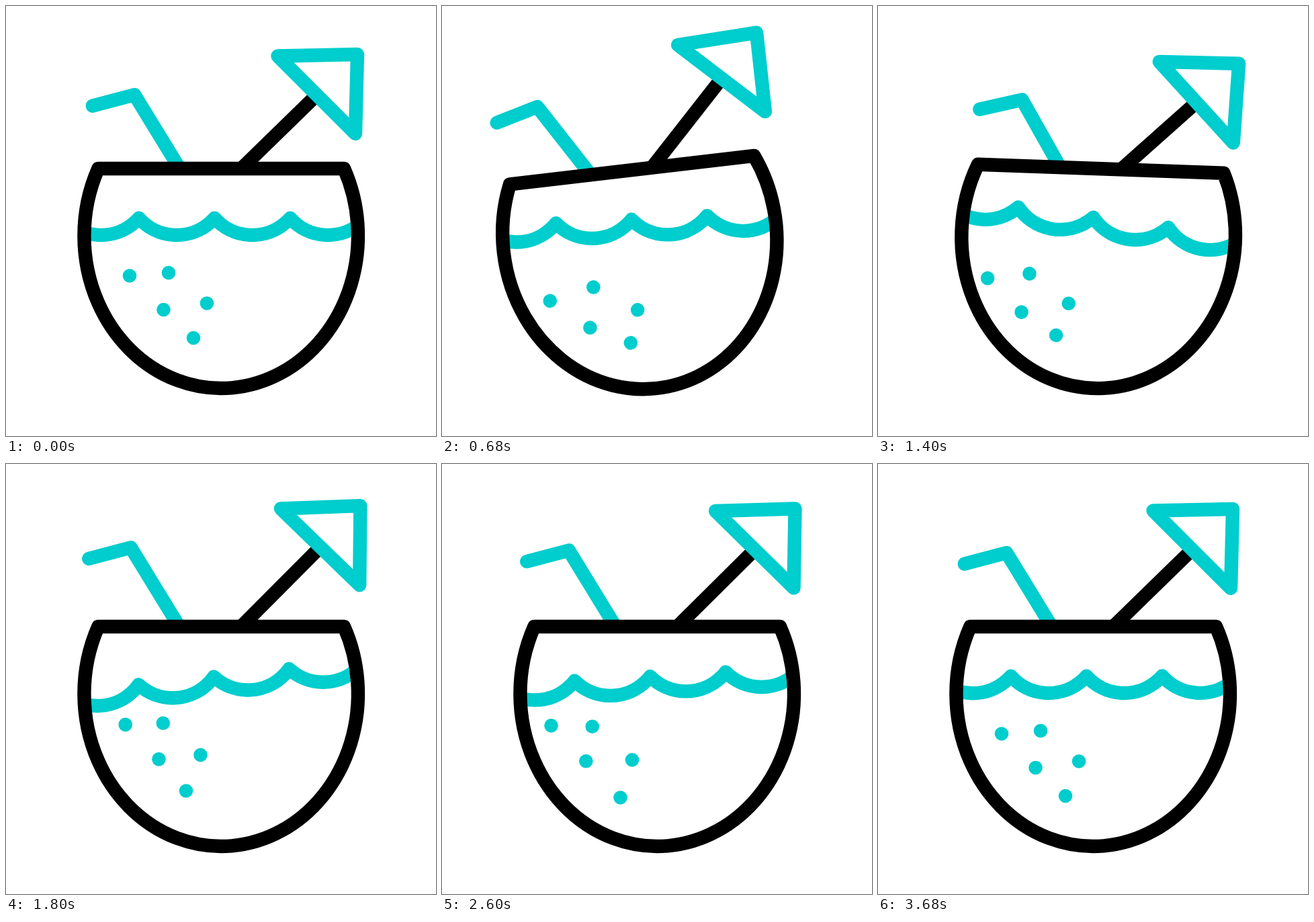
Write an HTML page with a canvas that moves like this. It is 640 by 640 pixels and loops after 3.76 s.

```html
<!DOCTYPE html>
<html lang="en">
<head>
<meta charset="utf-8">
<title>Coconut drink</title>
<style>
  html, body { margin: 0; width: 100%; height: 100%; overflow: hidden; background: #fff; }
  canvas { display: block; width: 640px; height: 640px; }
</style>
</head>
<body>
<canvas id="stage" width="640" height="640"></canvas>
<script>
const ctx = document.getElementById('stage').getContext('2d');
const TEAL = '#00cdcd';
const LOOP = 3760, STEP = 40, LAST = 3680, BEAT = 400, BEATS = 8;

// How many times the swing has decayed at a beat.
const inPairs = beat => Math.floor((beat - 1) / 2);
const swellThenPairs = beat => Math.abs(Math.floor(beat / 2) - 1);
const everyBeat = beat => Math.max(0, beat - 2);

// Eases from beat to beat between the values of key(beat).
function follow(t, key) {
  const pos = Math.max(t / BEAT, 0);
  const beat = Math.floor(pos);
  const p = pos - beat;
  return key(beat) + (key(beat + 1) - key(beat)) * p * p * (3 - 2 * p);
}

// Swings to alternating sides, starting towards the sign of size.
function swing(t, size, decay, order, { beats = BEATS, rest = 0 } = {}) {
  return follow(t, beat => {
    if (beat === 0) return 0;
    if (beat >= beats) return rest;
    return (beat % 2 ? size : -size) * decay ** order(beat);
  });
}

function rotateAbout(x, y, degrees) {
  ctx.translate(x, y);
  ctx.rotate(degrees * Math.PI / 180);
  ctx.translate(-x, -y);
}

function group(draw) {
  ctx.save();
  draw();
  ctx.restore();
}

function polyline(color, points, closed) {
  ctx.beginPath();
  points.forEach(([x, y]) => ctx.lineTo(x, y));
  if (closed) ctx.closePath();
  ctx.strokeStyle = color;
  ctx.stroke();
}

function bowlPath() {
  ctx.beginPath();
  ctx.ellipse(320.2, 342, 203.8, 227, 0, -0.456, Math.PI + 0.456);
  ctx.closePath();
}

function drawStraw(t) {
  const slide = swing(t - 80, 32, 0.68, everyBeat);
  ctx.translate(0.58 * slide, 0.82 * slide);
  polyline(TEAL, [[128.7, 148.7], [191.3, 132.2], [294, 300]]);
}

function drawUmbrella(t) {
  const slide = swing(t - 40, -40, 0.56, inPairs, { rest: 7.1 }) * Math.SQRT1_2;
  rotateAbout(350, 245, swing(t - 40, 3.4, 0.56, inPairs));
  ctx.translate(slide, -slide);
  ctx.lineCap = 'butt';
  polyline('#000', [[461, 134], [300, 291]]);
  polyline(TEAL, [[404.5, 74.5], [523, 72], [520, 190]], true);
}

function drawWave(t) {
  rotateAbout(320, 326, swing(t - 120, 13, 0.55, inPairs, { beats: 9 }));
  ctx.beginPath();
  for (let i = 0; i < 4; i++) {
    ctx.arc(141.5 + i * 112.6, 265.8, 75.2, Math.PI / 2 + 0.846, Math.PI / 2 - 0.846, true);
  }
  ctx.strokeStyle = TEAL;
  ctx.stroke();
}

// The bubbles drift along one shared route, each a step behind the one before.
const bubbles = [[279, 494], [299, 442.5], [242, 397], [234.5, 452], [184, 401.5]];
const route = [[0, 0], [-14, 26], [16, -3], [-27, 10], [-6, -14], [-16, -1], [-22, -13], [-5, 18]];
const routePoint = beat => route[beat] || route[0];

function drawBubbles(t) {
  ctx.fillStyle = TEAL;
  bubbles.forEach(([x, y], i) => {
    const late = t - i * STEP;
    const dx = follow(late, beat => routePoint(beat)[0]);
    const dy = follow(late, beat => routePoint(beat)[1]);
    ctx.beginPath();
    ctx.arc(x + dx, y + dy, 10.3, 0, Math.PI * 2);
    ctx.fill();
  });
}

function drawBowl(t) {
  bowlPath();
  ctx.fillStyle = '#fff';
  ctx.fill();
  group(() => {
    ctx.clip();
    group(() => drawWave(t));
    drawBubbles(t);
  });
  bowlPath();
  ctx.strokeStyle = '#000';
  ctx.stroke();
}

function render(t) {
  ctx.fillStyle = '#fff';
  ctx.fillRect(0, 0, 640, 640);
  group(() => {
    ctx.lineWidth = 20.4;
    ctx.lineCap = ctx.lineJoin = 'round';
    rotateAbout(320, 565, swing(t, 10.2, 0.6, swellThenPairs));
    group(() => drawStraw(t));
    group(() => drawUmbrella(t));
    drawBowl(t);
  });
}

const start = performance.now();
function tick() {
  const t = (performance.now() - start) % LOOP;
  render(Math.min(Math.floor(t / STEP) * STEP, LAST));
  requestAnimationFrame(tick);
}
tick();
</script>
</body>
</html>
```
